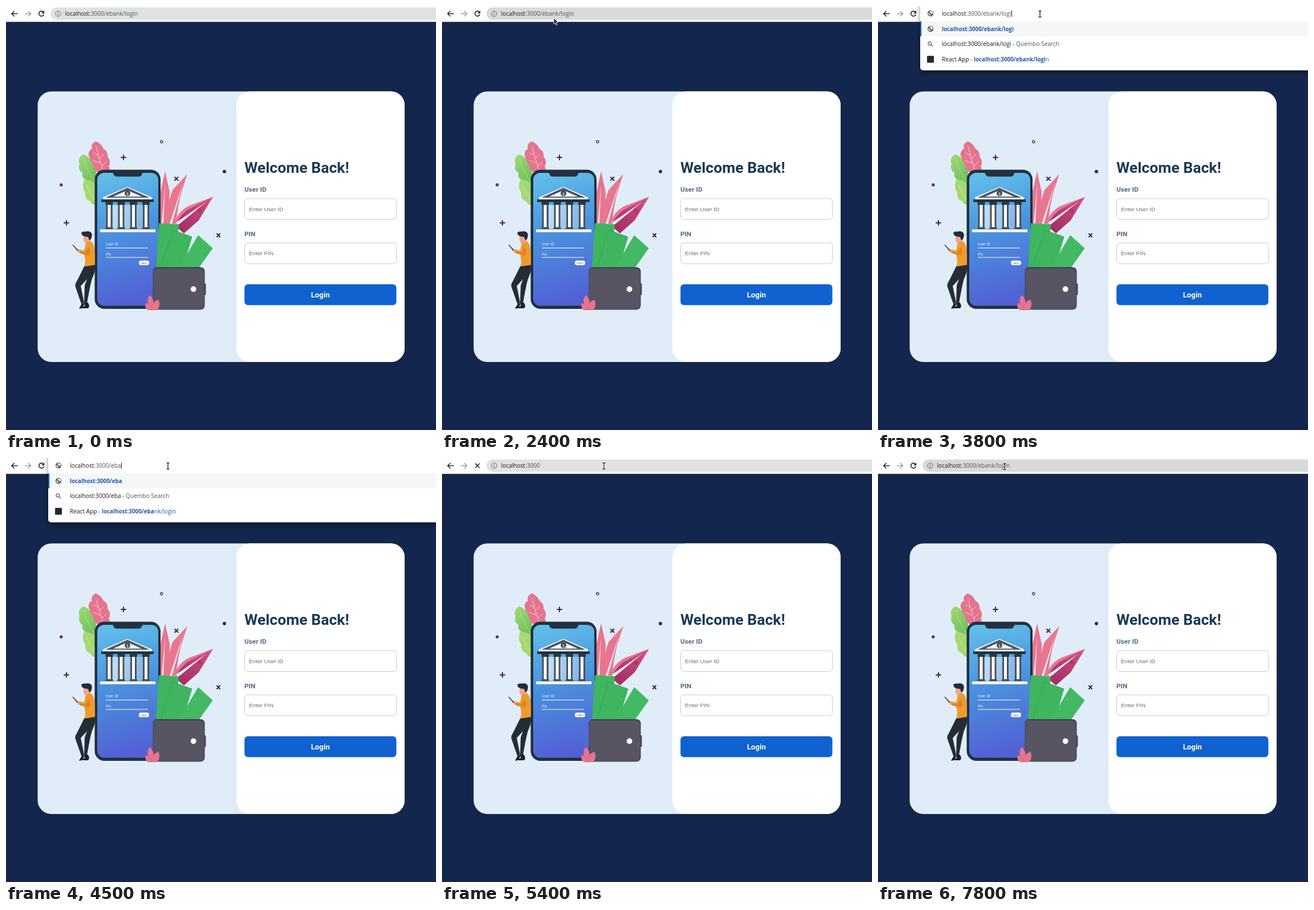
Animation, 754 px wide and 742 px high, one loop 8 s. Source, as an HTML page:

```html
<!DOCTYPE html>
<html lang="en">
<head>
<meta charset="utf-8">
<title>Login page</title>
<style>
  html, body { margin: 0; width: 100%; height: 100%; overflow: hidden; background: #14264d; }
  svg { display: block; width: 754px; height: 742px; }
  text { white-space: pre; }
  .ui { font: 10.15px "Open Sans", "Noto Sans", sans-serif; fill: #17181b; }
  .ui .dim { fill: #505458; }
  .ui .link { fill: #2358a8; }
  .ui .hit { fill: #2358a8; font-weight: 700; font-size: 9.8px; }
  .form { font-family: Roboto, sans-serif; font-weight: 700; }
  .hint { font: 9.95px "Liberation Sans", Arial, sans-serif; fill: #6f6f6f; }
  .mini { font-family: "Open Sans", "Noto Sans", sans-serif; fill: #fff; }
</style>
</head>
<body>
<svg viewBox="0 0 754 742" xmlns="http://www.w3.org/2000/svg">
  <defs>
    <linearGradient id="screen" gradientUnits="userSpaceOnUse" x1="170" y1="292" x2="235" y2="525">
      <stop offset="0" stop-color="#62c0ea"/>
      <stop offset="0.45" stop-color="#4a91dd"/>
      <stop offset="1" stop-color="#535dd5"/>
    </linearGradient>
    <linearGradient id="leaf" x1="0" y1="0" x2="0.6" y2="1">
      <stop offset="0" stop-color="#a3d977"/>
      <stop offset="1" stop-color="#6cc05c"/>
    </linearGradient>
    <linearGradient id="blade" x1="1" y1="0" x2="0" y2="1">
      <stop offset="0" stop-color="#d65282"/>
      <stop offset="1" stop-color="#9c2a60"/>
    </linearGradient>
    <linearGradient id="door" x1="0" x2="1">
      <stop offset="0" stop-color="#fff" stop-opacity="0.65"/>
      <stop offset="1" stop-color="#fff" stop-opacity="0.3"/>
    </linearGradient>
    <filter id="shadow" x="-10%" y="-10%" width="120%" height="130%">
      <feDropShadow dx="0" dy="4" stdDeviation="5" flood-color="#000" flood-opacity="0.45"/>
    </filter>
  </defs>

  <rect width="754" height="742" fill="#14264d"/>
  <rect x="55.5" y="149.5" width="643.5" height="473.5" rx="24" fill="#e0edf9"/>
  <rect x="404" y="149.5" width="295" height="473.5" rx="24" fill="#fff"/>

  <g id="foliage">
    <path fill="#e5748f" d="M157 237C150 241 149 246 151 250C143 253 144 262 147 266C143 274 149 279 152 281C152 287 160 292 168 292H178C182 288 183 284 180 281C184 274 182 268 178 264C179 256 175 252 171 250C168 243 162 238 157 237Z"/>
    <path fill="none" stroke="#f9d3d8" d="M158 246Q163 268 171 290M161 261L154 257M163 268L171 260M165 275L153 270M167 281L176 273"/>
    <path fill="url(#leaf)" d="M135 260C128 264 126 270 129 276C126 284 130 290 134 292C132 300 138 304 143 306C148 312 156 310 157 315L158 290C152 284 154 278 150 274C148 266 141 261 135 260Z"/>
    <path fill="none" stroke="#c3e6a2" stroke-width="0.8" d="M136 267Q143 290 157 310"/>
    <path fill="#a5d970" d="M137 304C134 314 134 320 139 326C137 334 142 340 148 342C150 347 155 349 158 348V312C152 306 145 304 137 304Z"/>
    <path fill="none" stroke="#d2eeb4" stroke-width="0.8" d="M140 311Q146 328 157 343"/>
    <path fill="#e8768f" d="M279 289L270 330V381H281Q287 345 287 326ZM318 294L292 322Q282 350 280 381H298Q301 352 307 328ZM363 334L320 350Q300 361 296 380L302 384Z"/>
    <path fill="url(#blade)" d="M363 334L318 357Q303 369 297 385L312 398L338 375Z"/>
    <path fill="#e0edf9" d="M279 312L273 381H276ZM311 308L287 381H291ZM352 342L298 379L301 384Z"/>
    <circle cx="340" cy="358" r="2.4" fill="none" stroke="#7d2459"/>
  </g>

  <g fill="none" stroke="#38205a" stroke-width="2" stroke-linecap="round">
    <path d="M202 265h8M206 261v8M102 379.5h8M106 375.5v8M296 299.5l5.5 5.5m0-5.5l-5.5 5.5M370 398.5l5 5.5m0-5.5l-5 5.5"/>
    <circle cx="272.8" cy="237.5" r="2.2" stroke-width="1.2"/>
  </g>
  <circle cx="383" cy="289.7" r="3" fill="#38205a"/>
  <circle cx="96.8" cy="313" r="2.8" fill="#6a3169"/>

  <g id="phone">
    <rect x="155.5" y="286.5" width="115.5" height="243.5" rx="17" fill="#22303f"/>
    <rect x="160" y="292" width="107" height="232.5" rx="12" fill="url(#screen)"/>
    <path fill="#22303f" d="M186 291H241C238 292 239 298.5 233 298.5H194C188 298.5 189 292 186 291Z"/>
    <path fill="#fff" d="M213 316.5L256 335V338.5H170V335Z"/>
    <path fill="#4d5561" d="M213 318L252 335.5H174Z"/>
    <path fill="#fff" d="M213 322.5L238 333.5H188Z"/>
    <circle cx="213" cy="327.8" r="5" fill="#434b56"/>
    <text class="mini" x="213" y="330.7" font-size="8" text-anchor="middle">$</text>
    <rect x="167" y="338.5" width="92" height="4.5" fill="#1f3039"/>
    <rect x="187" y="348" width="53" height="42" fill="url(#door)"/>
    <g id="pillars"></g>
    <rect x="165" y="391" width="97" height="4.8" fill="#fff"/>
    <text class="mini" x="175" y="419" font-size="6.4">User ID</text>
    <text class="mini" x="175" y="436.5" font-size="6.4">Pin</text>
    <path stroke="#fff" d="M175 423.5h74M175 440h74"/>
    <rect x="233" y="445.5" width="18" height="8" rx="3.5" fill="#fff"/>
    <text class="mini" x="242" y="451" font-size="4.3" text-anchor="middle" style="fill:#333">Log in</text>
  </g>

  <g id="wallet">
    <path fill="#3fb55f" d="M268 380L303 382L296 460H263Z"/>
    <path fill="#3fb55f" stroke="#2f9c50" stroke-width="0.8" d="M292 392L326 404L309 460H271Z"/>
    <path fill="#43b963" d="M337 401L362.5 424L337 460H302Z"/>
    <path fill="#3c4250" d="M262 457H340Q348.500 457 348.500 465V523Q348.500 531.500 340 531.500H257.500V461Z"/>
    <rect x="343" y="485" width="7.5" height="21" rx="2.5" fill="#4c4a59"/>
    <path fill="#575563" d="M261 459H338Q347 459 347 467V522Q347 530.5 338 530.5H258.5V461Z"/>
    <circle cx="328.7" cy="495.5" r="4.9" fill="#fff"/>
    <g fill="#e5748f" stroke="#c95678" stroke-width="0.5">
      <path d="M252 506C245 514 249 525 255 532C261 525 260 512 252 506Z"/>
      <path d="M245 520C243 527 246 532 251 532H257C255 525 250 521 245 520Z"/>
      <path d="M267 514C258 517 255 525 255 532H265C270 527 270 519 267 514Z"/>
    </g>
  </g>

  <g id="reader">
    <path fill="#242c38" d="M138 454L156 453C157 466 153 471 150 480C147 492 145 504 142 520H137L138 489L142 478L131 490L137 519L132 521L122 492Q120 487 124 482Z"/>
    <path fill="#1c222c" d="M133 520L138 520C138 524 134 526 130 530H128.500C129 526 132 524 133 520ZM138 519H143.500C146 523 147 526 144 529H130Q132 526 138 525Z"/>
    <path fill="#f2a58d" d="M136 402H148V413L142 417L136 412Z"/>
    <path fill="#242b38" d="M132 397C134 394 138 395 141 394.500C148 393 152 398 150.500 403C150 407 148 410 146 410L144 404Q137 404 133.500 401Z"/>
    <path fill="#ef9a2c" d="M140 414L149 412C156 417 156 430 156 453L138 456C140 445 138 440 137 434L126 431L128 426L137 428Z"/>
    <path fill="#dd8524" d="M144 422Q150 425 146 437L130 433L128.500 429L140 431Z"/>
    <path fill="#f2a58d" d="M121 424L127 425L128.500 430L124 429Z"/>
    <path stroke="#2a3140" stroke-width="1.5" d="M117 418L126 428"/>
  </g>

  <g class="form">
    <text x="418" y="292" font-size="26.6" fill="#1b3a55">Welcome Back!</text>
    <g font-size="11.8" fill="#53697f">
      <text x="418" y="325">User ID</text>
      <text x="418" y="402.5">PIN</text>
    </g>
    <g fill="#fff" stroke="#c8cbd8">
      <rect x="418.500" y="337" width="266" height="36.500" rx="5.500"/>
      <rect x="418.500" y="414.500" width="266" height="36.500" rx="5.500"/>
    </g>
    <rect x="418.2" y="487" width="266.3" height="36.5" rx="6" fill="#0f62cf"/>
    <text x="551.3" y="510" font-size="13.3" fill="#fff" text-anchor="middle">Login</text>
  </g>
  <text class="hint" x="426" y="358.5">Enter User ID</text>
  <text class="hint" x="426" y="436.2">Enter PIN</text>

  <rect width="754" height="27" fill="#fff"/>
  <rect y="27" width="754" height="1" fill="#c3c7cd"/>
  <g fill="none" stroke-width="1.5">
    <path stroke="#202124" d="M20.5 13.5H10M14.7 8.7L9.900 13.5L14.7 18.3"/>
    <path stroke="#9b9da0" d="M33 13.5H43.5M38.8 8.7L43.6 13.5L38.8 18.3"/>
  </g>
  <g id="chrome"></g>
  <g id="cursor"></g>
</svg>
<script>
const LOOP = 8000;
const STEP = 100;
const HOST = 'localhost:3000';
const $ = id => document.getElementById(id);
const span = (cls, s) => `<tspan class="${cls}">${s}</tspan>`;
const label = (x, y, s) => `<text class="ui" x="${x}" y="${y}">${s}</text>`;
const url = s => s.slice(0, 9) + span('dim', s.slice(9));
const last = (list, t) => list.filter(e => e[0] <= t).pop();

$('pillars').innerHTML = [181, 202, 223.5, 245.5].map(x => `
  <rect x="${x - 6.5}" y="343" width="13" height="5" fill="#2b3842"/>
  <rect x="${x - 5.5}" y="348" width="11" height="39" fill="#4b515c"/>
  <rect x="${x - 2.5}" y="348" width="5" height="39" fill="#fff"/>
  <rect x="${x - 6.5}" y="387" width="13" height="3.5" fill="#4b515c"/>`).join('');

const icons = {
  info: y => `<circle cx="91.5" cy="${y}" r="4.7" fill="none" stroke="#5f6368"/>
    <path stroke="#5f6368" stroke-width="1.2" d="M91.5 ${y - 0.7}v3.3M91.5 ${y - 2.6}v1.2"/>`,
  globe: y => `<circle cx="92" cy="${y}" r="5.2" fill="#5f6368"/>
    <path fill="#fff" d="M88 ${y - 1}l3.5 2.5v2.5q-3-1-3.5-5zM92 ${y - 4}q4 0 4 4l-2.5 1-1-2-2.5-1z"/>`,
  search: y => `<g fill="none" stroke="#5f6368" stroke-width="1.3">
    <circle cx="90.8" cy="${y - 1}" r="2.9"/><path d="M93 ${y + 1.2}l3.3 3.3"/></g>`,
  app: y => `<rect x="86" y="${y - 6}" width="12" height="12" rx="1" fill="#1d2b36"/>`
};

const reload = `<path fill="none" stroke="#202124" stroke-width="1.6" d="M65.5 10.5A4.4 4.4 0 1 0 66.3 14.7"/>
  <path fill="#202124" d="M67.2 8V13H62.2Z"/>`;
const stop = '<path stroke="#202124" stroke-width="1.5" d="M58.3 9.6l7.6 7.6m0-7.6l-7.6 7.6"/>';

// [time, x, y, shape]: "a" arrow, "i" text beam
const moves = [
  [1100, 227, 33, 'a'], [1200, 119, 14, 'i'],
  [1400, 83, 16, 'a'], [1500, 98, 23, 'a'], [1600, 130, 30, 'a'], [1700, 175, 35, 'a'],
  [1800, 216, 36, 'a'], [1900, 239, 36, 'a'], [2000, 236, 31, 'a'], [2100, 224, 27, 'a'], [2200, 210, 24, 'a'],
  [2300, 202, 22, 'a'], [2400, 196, 21, 'a'], [2500, 245, 15, 'i'], [2600, 280, 13, 'i'], [2700, 286, 12, 'i'],
  [3300, 285, 13, 'i'], [3400, 284, 14, 'i'],
  [6400, 266, 17, 'i'], [6500, 236, 25, 'a'], [6600, 192, 29, 'a'], [6700, 145, 30, 'a'], [6800, 108, 28, 'a'],
  [6900, 88, 25, 'a'], [7000, 104, 22, 'a'], [7100, 138, 17, 'i'], [7200, 170, 15, 'i'],
  [7300, 186, 15, 'i'], [7400, 210, 17, 'i'], [7500, 231, 20, 'i'], [7600, 229, 19, 'i'], [7700, 225, 16, 'i'], [7800, 222, 15, 'i']
];

const beam = (color, width) => `<path fill="none" stroke="${color}" stroke-width="${width}"
  d="M-2.5-5.3H-0.6L0-4.6L0.6-5.3H2.5M0-4.8V4.8M-2.5 5.3H-0.6L0 4.6L0.6 5.3H2.5"/>`;
const shapes = {
  a: '<path fill="#111" stroke="#fff" stroke-width="0.9" d="M0 0V10.5L2.5 8.3L4.3 12.5L6.1 11.7L4.3 7.7H7.6Z"/>',
  i: beam('#fff', 2.8) + beam('#161616', 1.3)
};

// [time, path in the address bar]
const typed = [[0, '/ebank/login'], [3700, '/ebank/logi'], [4300, '/ebank/log'], [4400, '/ebank/'],
  [4500, '/eba'], [4600, '/'], [5300, ''], [5900, '/ebank/login']];

function suggestions(path) {
  const text = HOST + path;
  const title = 'React App' + span('dim', ' - ');
  const match = rest => span('hit', text) + span('link', rest);
  const rows = path === '/'
    ? [['app', title + span('hit', HOST)]]
    : [['globe', span('hit', text)]];
  rows.push(['search', text + span('dim', ' - Quembo Search')]);
  if (path === '/') {
    for (const p of ['ebank/login', 'login', 'not-found']) rows.push(['app', title + match(p)]);
    for (const p of ['random', 'dshkfs']) rows.push(['app', match(p)]);
  } else {
    rows.push(['app', title + match('/ebank/login'.slice(path.length))]);
  }
  const bottom = 32.5 + rows.length * 26.64;
  return `<rect x="74" y="-10" width="700" height="${bottom + 10}" rx="5" fill="#fff" filter="url(#shadow)"/>
    <rect x="74" y="27" width="680" height="26" fill="#f5f6f6"/>
    <rect x="74" y="27" width="2.2" height="26" fill="#1a66c9"/>` +
    rows.map(([icon, s], i) => {
      const y = 40 + i * 26.6;
      return icons[icon](y) + label(112, y + 3.7, s);
    }).join('');
}

function bar(t) {
  const within = (a, b) => t >= a && t < b;
  const path = last(typed, t)[1];
  const open = within(3700, 5300);
  const hover = within(2300, 2600) || t >= 6000;
  const x = open ? 112 : 103.5;
  let out = within(5300, 6000) ? stop : reload;
  if (open) {
    out += suggestions(path) + icons[path === '/' ? 'app' : 'globe'](13);
  } else {
    out += within(2600, 5300)
      ? '<rect x="78.5" y="2.8" width="720" height="21" rx="10.5" fill="#fff" stroke="#a3bbe0" stroke-width="1.2"/>'
      : `<rect x="78" y="2.5" width="720" height="21.5" rx="10.7" fill="${hover ? '#d8dad9' : '#dfe2e0'}"/>`;
    out += icons.info(13.5);
  }
  if (within(2600, 2900)) out += '<rect x="103" y="7" width="129" height="13" fill="#b9d5f8"/>';
  $('chrome').innerHTML = out + label(x, 17, url(HOST + path));

  if (within(3000, 3500) || within(3700, 5200)) {
    const end = x + $('chrome').lastElementChild.getComputedTextLength() + 0.5;
    $('chrome').insertAdjacentHTML('beforeend', `<rect x="${end}" y="7.5" width="1" height="11.5" fill="#202124"/>`);
  }
}

let shown = -1;
function draw(time) {
  const t = Math.floor((time % LOOP) / STEP) * STEP;
  if (t === shown) return;
  shown = t;
  bar(t);
  const m = last(moves, t);
  $('cursor').innerHTML = m ? `<g transform="translate(${m[1]} ${m[2]})">${shapes[m[3]]}</g>` : '';
}

const start = performance.now();
function tick() {
  draw(performance.now() - start);
  requestAnimationFrame(tick);
}
tick();
</script>
</body>
</html>
```
